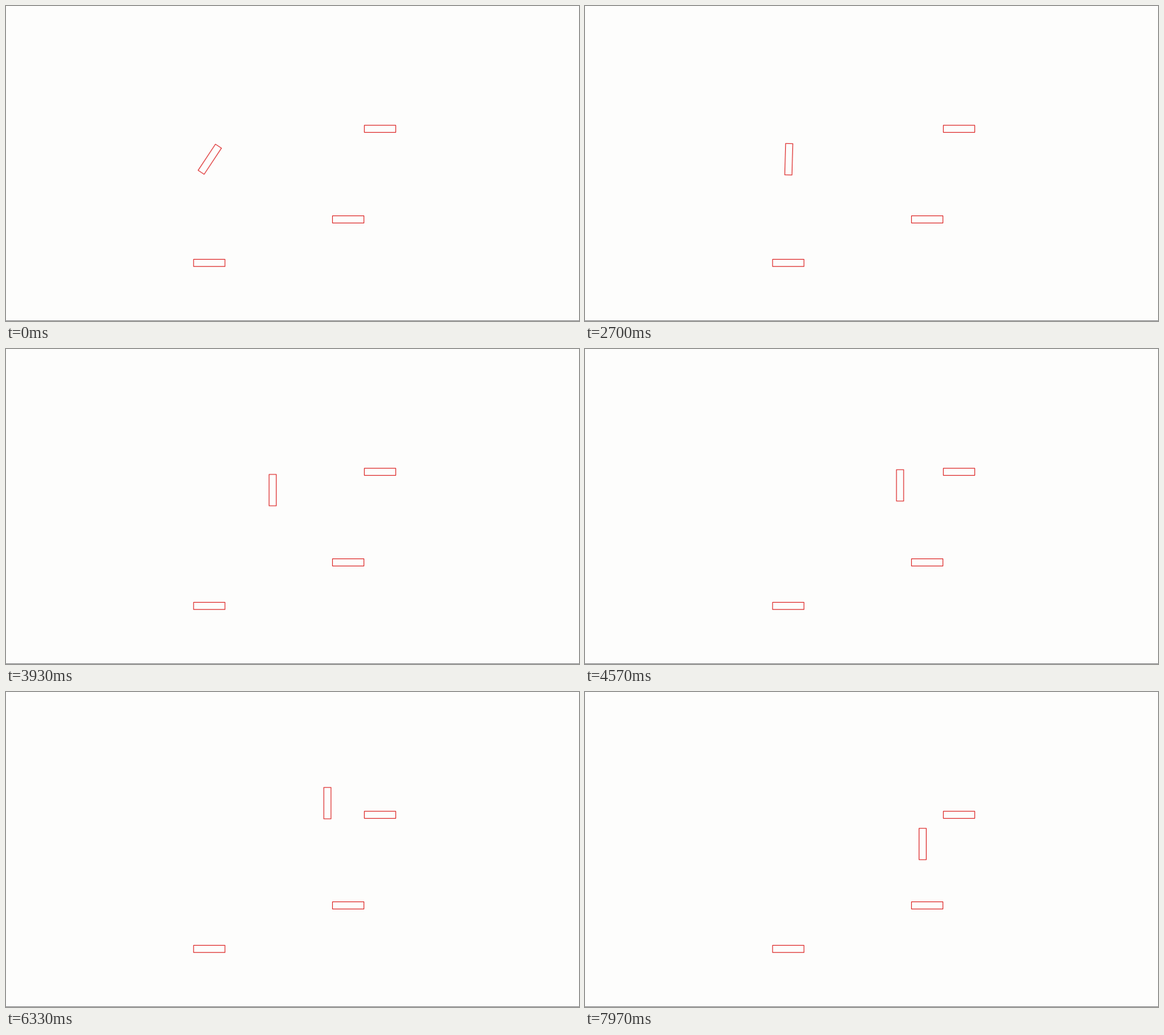
Animation of 1008 by 555 pixels, one loop 8 s. Source, as an HTML page:

```html
<!DOCTYPE html>
<html lang="en">
<head>
<meta charset="utf-8">
<title>Moving blocks</title>
<style>
  html, body { margin: 0; width: 100%; height: 100%; overflow: hidden; background: #fdfdfc; }
  svg { display: block; width: 1008px; height: 555px; }
  .block { fill: none; stroke: #dc2222; stroke-width: 1.2; stroke-linejoin: round; }
</style>
</head>
<body>
<svg viewBox="0 0 1008 555">
  <defs><rect id="block" x="-27.6" y="-6.3" width="55.2" height="12.6"/></defs>
  <rect y="554" width="1008" height="1" fill="#777"/>
  <g class="block">
    <use href="#block" x="658" y="216.4"/>
    <use href="#block" x="602" y="376"/>
    <use href="#block" x="357.6" y="452.6"/>
    <g id="mover"><g id="spinner"><use href="#block"/></g></g>
  </g>
</svg>
<script>
  const LOOP = 8000;

  // [time, x, y, easing to the next step]
  const path = [
    [0, 358.5, 270, 'linear'],
    [2700, 358.5, 270, 'ease-in'],
    [3270, 381.2, 257.2, 'linear'],
    [4570, 554.2, 240.3, 'linear'],
    [4770, 568, 238, 'ease-in-out'],
    [5570, 584.6, 207, 'ease-in-out'],
    [6330, 565.4, 195.8, 'linear'],
    [6870, 565.4, 195.8, 'ease-in-out'],
    [7970, 594, 267.8, 'linear'],
    [LOOP, 594, 267.8, 'linear']
  ];

  // [time, degrees, easing to the next step]
  const turns = [
    [0, -56.6, 'step-end'],
    [1030, -62, 'step-end'],
    [2030, -67.4, 'linear'],
    [2270, -67.4, 'ease-in-out'],
    [2800, -90, 'linear'],
    [LOOP, -90, 'linear']
  ];

  function play(id, frames) {
    const animation = document.getElementById(id)
      .animate(frames, { duration: LOOP, iterations: Infinity });
    animation.startTime = 0;
  }

  play('mover', path.map(([time, x, y, easing]) => ({
    offset: time / LOOP, transform: `translate(${x}px, ${y}px)`, easing
  })));
  play('spinner', turns.map(([time, angle, easing]) => ({
    offset: time / LOOP, transform: `rotate(${angle}deg)`, easing
  })));
</script>
</body>
</html>
```
